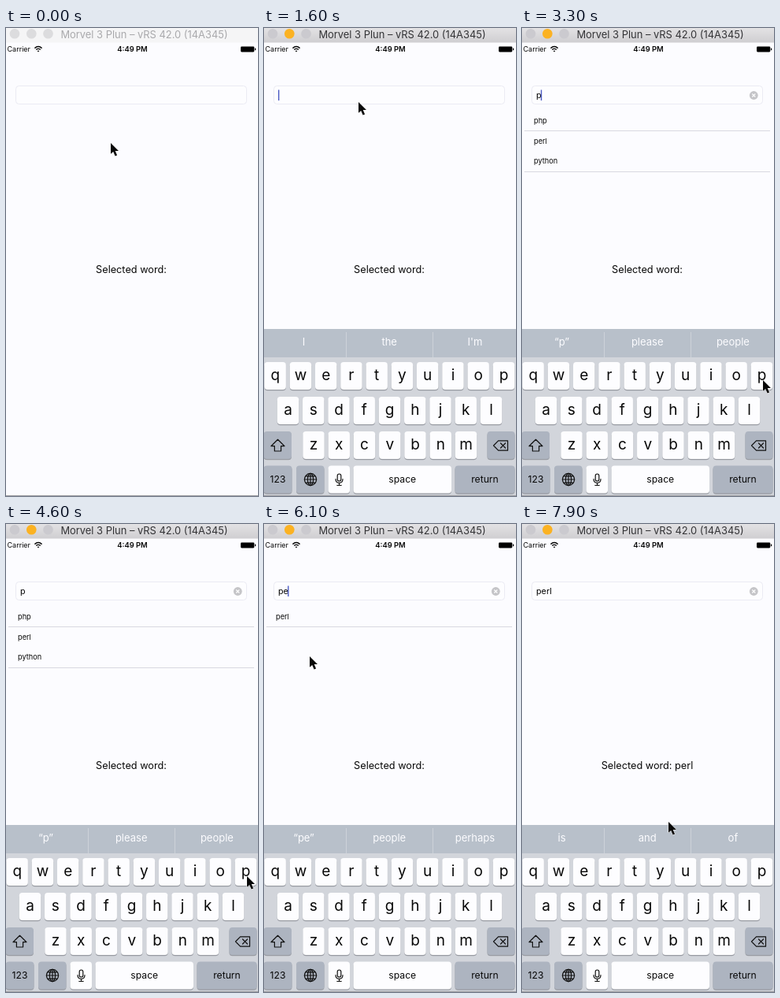
Recreate the animation shown at these times as an HTML page. Size 320 by 594 pixels, loop 8000 ms.

```html
<!DOCTYPE html>
<html lang="en">
<head>
<meta charset="utf-8">
<title>Autocomplete field</title>
<style>
  html, body { margin: 0; width: 100%; height: 100%; overflow: hidden; background: #fcfcff; }
  svg { display: block; width: 320px; height: 594px; }
  text { font-family: Inter, Roboto, sans-serif; fill: #080808; white-space: pre; }
  .mid { text-anchor: middle; }
  .title { font-size: 12.9px; }
  .status { font-size: 9px; }
  .time { font-size: 9.4px; font-weight: 600; }
  .label { font-size: 12.7px; }
  .input { font-size: 10.8px; }
  .row { font-size: 9.2px; }
  .hint { font-size: 13px; fill: #fcfcff; }
  .letter { font-size: 19px; }
  .word { font-size: 12.2px; }
  .icon { fill: none; stroke: #111; stroke-width: 1.2; stroke-linejoin: round; stroke-linecap: round; }
  .rule { stroke: #d9d9e0; stroke-width: 1; }
</style>
</head>
<body>
<svg viewBox="0 0 320 594">
  <defs>
    <linearGradient id="bar" x2="0" y2="1">
      <stop stop-color="#e3e2e4"/><stop offset="1" stop-color="#cfced1"/>
    </linearGradient>
  </defs>
  <rect width="320" height="594" fill="#fcfcff"/>

  <rect id="titleBar" width="320" height="18.5"/>
  <g id="dots">
    <circle cx="11" cy="7.2" r="6.3"/><circle cx="32.3" cy="7.2" r="6.3"/><circle cx="53.5" cy="7.2" r="6.3"/>
  </g>
  <text id="title" class="title mid" x="175.5" y="12.8">Morvel 3 Plun – vRS 42.0 (14A345)</text>

  <text class="status" x="1.5" y="30.3">Carrier</text>
  <g fill="none" stroke="#080808" stroke-width="1.4">
    <path d="M36.4 25.6Q41 21.6 45.6 25.6M38.2 27.5Q41 25.2 43.8 27.5"/>
    <path d="M39.6 29L41 30.5L42.4 29Q41 28 39.6 29Z" fill="#080808" stroke="none"/>
  </g>
  <text class="time mid" x="160.5" y="30.3">4:49 PM</text>
  <rect x="298" y="23.4" width="17.3" height="7" rx="1.3"/>
  <rect x="316" y="25.5" width="1.2" height="2.8" rx=".6"/>

  <rect x="12.5" y="73.5" width="293" height="23" rx="4" fill="#fdfdff" stroke="#ebebf3"/>
  <text id="input" class="input" x="18" y="88.8"></text>
  <rect id="caret" y="78.5" width="1.4" height="13.5" fill="#4c5bc4"/>
  <g id="clear">
    <circle cx="294.3" cy="85.5" r="5.4" fill="#c5c5c8"/>
    <path d="M292.3 83.5l4 4m0-4l-4 4" stroke="#fff" stroke-width="1.1"/>
  </g>
  <g id="list"></g>
  <text id="label" class="label mid" x="159" y="311.3"></text>

  <g id="keyboard">
    <rect y="382" width="320" height="214" fill="#d2d5db"/>
    <rect y="382" width="320" height="36" fill="#b8c0ca"/>
    <path d="M104.5 386V418M214.5 386V418" stroke="#cdd2d9"/>
    <g id="hints"></g>
    <g id="keys"></g>
    <g class="icon">
      <path d="M17.5 522.3L26 530.7H21.6V537H13.4V530.7H9Z"/>
      <path d="M291.5 530L297.5 523.8H309.5V536.2H297.5ZM300.5 527l6 6m0-6l-6 6"/>
      <circle cx="59" cy="573" r="7.6"/>
      <ellipse cx="59" cy="573" rx="3.6" ry="7.6"/>
      <path d="M59 565.4V580.6M51.4 573H66.6M53 568.8H65M53 577.2H65"/>
      <rect x="93.2" y="566" width="4.6" height="9" rx="2.3"/>
      <path d="M91 572.5Q91 577.3 95.5 577.3T100 572.5M95.5 577.3V580.5M92.8 580.5H98.2"/>
    </g>
  </g>
  <path d="M0 593.5H320" stroke="#a0a0a4"/>

  <path id="cursor" d="M0 0V13.8L3.2 10.9L5.6 16.6L8.1 15.5L5.7 9.9H10Z"
        fill="#080808" stroke="#fff" stroke-width="1" paint-order="stroke"/>
</svg>
<script>
const LOOP = 8000, STEP = 100;
const CLICK = 1200, TYPE_P = 2900, TYPE_E = 5500, PICK = 7000;
const el = id => document.getElementById(id);
const show = (node, on) => node.setAttribute('visibility', on ? 'visible' : 'hidden');

const states = [
  { from: 0, text: '', hints: ['I', 'the', "I'm"], rows: [], word: '' },
  { from: TYPE_P, text: 'p', hints: ['“p”', 'please', 'people'], rows: ['php', 'perl', 'python'], word: '' },
  { from: TYPE_E, text: 'pe', hints: ['“pe”', 'people', 'perhaps'], rows: ['perl'], word: '' },
  { from: PICK, text: 'perl', hints: ['is', 'and', 'of'], rows: [], word: ' perl' }
];

// Pointer stops: time, x, y
const stops = [
  [300, 133, 146], [900, 120, 94], [1700, 120, 94], [2600, 306, 447],
  [4600, 306, 447], [5300, 80, 446], [5500, 80, 446], [6100, 58, 168],
  [6600, 55, 122], [7100, 55, 122], [7800, 186, 378]
];

const label = (cls, x, y, s) => `<text class="${cls}" x="${x}" y="${y}">${s}</text>`;

function key(x, y, w, s = '', cls = 'letter', dark = false, base = 22.5) {
  const box = (dy, fill) =>
    `<rect x="${x}" y="${y + dy}" width="${w}" height="35" rx="4" fill="${fill}"/>`;
  return box(1.2, '#989ba2') + box(0, dark ? '#adb4c0' : '#fdfdff') +
    label(cls + ' mid', x + w / 2, y + base, s);
}

function buildKeys() {
  const lines = [['qwertyuiop', 14.2, 424], ['asdfghjkl', 30.5, 468], ['zxcvbnm', 63, 512]];
  let out = '';
  for (const [chars, cx, y] of lines)
    [...chars].forEach((c, i) => out += key(cx + i * 32.25 - 13.7, y, 27.4, c));
  out += key(-.5, 512, 35.5, '', 'word', true) + key(283.5, 512, 35, '', 'word', true);
  out += key(-.5, 555.5, 36, '123', 'word', true, 21.5) + key(41, 555.5, 35.5, '', 'word', true);
  out += key(81.5, 555.5, 27.5) + key(113.5, 555.5, 124.5, 'space', 'word', false, 21);
  out += key(242.5, 555.5, 76, 'return', 'word', true, 21);
  el('keys').innerHTML = out;
}

function pointer(t) {
  const i = stops.findIndex(s => s[0] > t);
  if (i < 0) return stops[stops.length - 1].slice(1);
  if (i === 0) return stops[0].slice(1);
  const [t0, x0, y0] = stops[i - 1], [t1, x1, y1] = stops[i];
  const p = (t - t0) / (t1 - t0), e = p * p * (3 - 2 * p);
  return [x0 + (x1 - x0) * e, y0 + (y1 - y0) * e];
}

function setState(s) {
  el('input').textContent = s.text;
  el('label').textContent = 'Selected word:' + s.word;
  el('hints').innerHTML = s.hints.map((h, i) => label('hint mid', 50.5 + i * 108.7, 403.2, h)).join('');
  const rules = s.rows.length > 1 ? [130.5, 182.5] : s.rows.length ? [130.5] : [];
  el('list').innerHTML = s.rows.map((r, i) => label('row', 15, 121 + i * 25.7, r)).join('') +
    rules.map(y => `<path class="rule" d="M3 ${y}H315"/>`).join('');
  show(el('clear'), s.text);
  el('caret').setAttribute('x', 18 + (s.text ? el('input').getComputedTextLength() - .8 : 0));
}

function setActive(on) {
  el('titleBar').setAttribute('fill', on ? 'url(#bar)' : '#f5f5f6');
  el('title').style.fill = on ? '#333336' : '#a9a9ac';
  el('dots').setAttribute('fill', on ? '#cbcacf' : '#dcdcde');
  el('dots').children[1].setAttribute('fill', on ? '#fbb222' : '#dcdcde');
}

let current = null;
function draw(t) {
  const s = states.filter(v => v.from <= t).pop();
  if (s !== current) setState(current = s);
  setActive(t >= CLICK);

  const blinkStart = s.from || 1400;
  show(el('caret'), t >= blinkStart && (t - blinkStart) % 1000 <= 600);

  const rise = Math.min(1, Math.max(0, (t - 1300) / 300));
  el('keyboard').setAttribute('transform', `translate(0 ${214 * (1 - rise) ** 3})`);
  show(el('keyboard'), rise > 0);

  const [x, y] = pointer(t);
  el('cursor').setAttribute('transform', `translate(${x} ${y})`);
}

buildKeys();
const start = performance.now();
function tick() {
  const t = (performance.now() - start) % LOOP;
  draw(Math.floor(t / STEP) * STEP);
  requestAnimationFrame(tick);
}
tick();
</script>
</body>
</html>
```
